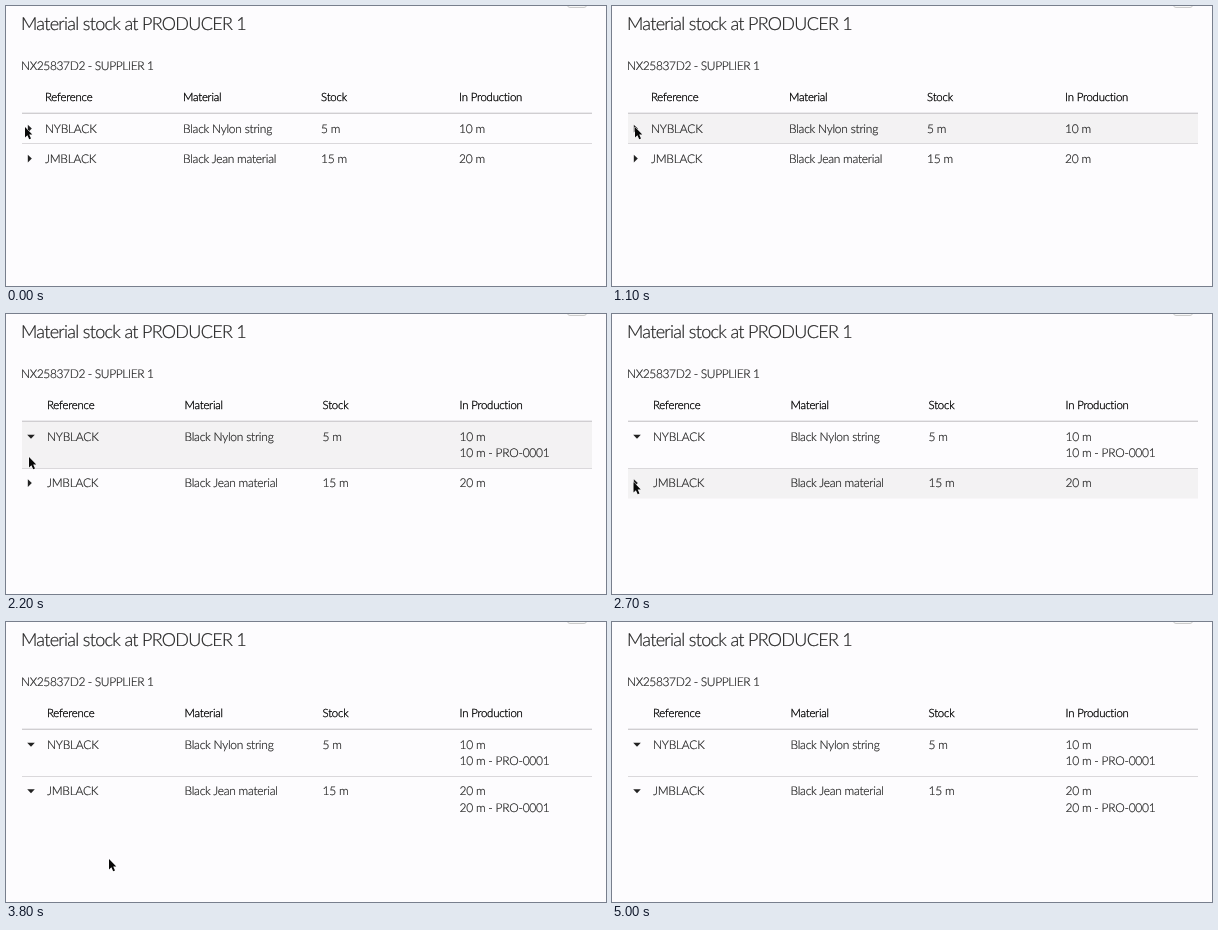
Write an HTML page that moves like this. It is 600 px wide and 280 px high and loops after 9300 ms.

```html
<!DOCTYPE html>
<html lang="en">
<head>
<meta charset="utf-8">
<title>Material stock</title>
<style>
  html, body { margin: 0; width: 100%; height: 100%; overflow: hidden; background: #fdfcfe; }
  svg { display: block; }
  text {
    font: 300 12px Lato, sans-serif; letter-spacing: -.25px; white-space: pre;
    fill: #222; stroke: #222; stroke-width: .2px; text-rendering: geometricPrecision;
  }
  .title { font-size: 18px; letter-spacing: -.7px; }
  .supplier { letter-spacing: -.38px; }
  .head { font-size: 11.4px; letter-spacing: -.2px; fill: #000; stroke: #000; stroke-width: .3px; }
</style>
</head>
<body>
<svg id="stage" width="600" height="280" viewBox="0 0 600 280">
  <rect x="561.5" y="-12" width="19" height="13.5" rx="2.5" fill="#f8f8f8" stroke="#ccc"/>
  <text class="title" x="15" y="24">Material stock at PRODUCER 1</text>
  <text class="supplier" x="15" y="64">NX25837D2 - SUPPLIER 1</text>
</svg>
<script>
const LOOP = 9300;
const OPEN_TIMES = [1300, 2900];
const HOVERS = [[200, 2300], [2300, 3800]];
const HEADINGS = ['Reference', 'Material', 'Stock', 'In Production'];
const ROWS = [
  ['NYBLACK', 'Black Nylon string', '5 m', '10 m'],
  ['JMBLACK', 'Black Jean material', '15 m', '20 m']
];
const CLOSED_COLUMNS = [39, 177, 315, 453];
const OPEN_COLUMNS = [41, 178.5, 316.5, 453.5];

// Pointer positions: time, x, y; each is held until the next
const POINTER = [
  [0, 19, 121], [200, 20, 121], [300, 22, 121], [400, 23, 121],
  [2200, 23, 143], [2300, 19, 167], [2500, 20, 167], [2700, 21.5, 168],
  [3000, 22.5, 168], [3800, 103, 237], [3900, 132, 251], [4000, 147, 258],
  [4400, 188, 272], [4500, 200, 300]
];

const stage = document.getElementById('stage');

function add(tag, attributes = {}, content = '') {
  const node = document.createElementNS('http://www.w3.org/2000/svg', tag);
  set(node, attributes);
  node.textContent = content;
  return stage.appendChild(node);
}

function set(node, attributes) {
  for (const name in attributes) node.setAttribute(name, attributes[name]);
}

const addCells = (labels, className) =>
  labels.map(label => add('text', { class: className }, label));

const placeCells = (cells, columns, y) =>
  cells.forEach((cell, i) => set(cell, { x: columns[i], y }));

const headings = addCells(HEADINGS, 'head');
const rows = ROWS.map(labels => ({
  band: add('rect', { x: 16, width: 570, fill: '#f3f2f3' }),
  cells: addCells(labels, 'cell'),
  detail: add('text', { x: 453.5 }, labels[3] + ' - PRO-0001'),
  arrow: add('path', { fill: '#222' })
}));
add('rect', { x: 16, y: 106.6, width: 570, height: 1.4, fill: '#d0ced1' });
const rowLine = add('rect', { x: 16, width: 570, height: 1, fill: '#dad8db' });
const pointer = add('path', {
  d: 'M0 0V10.4L2.4 8.2L4.2 12.2L6 11.4L4.2 7.5H7.3Z',
  fill: '#080808', stroke: '#fff', 'stroke-width': 1, 'paint-order': 'stroke'
});

function draw(time) {
  const columns = time >= OPEN_TIMES[0] ? OPEN_COLUMNS : CLOSED_COLUMNS;
  placeCells(headings, columns, 95.2);

  let top = 108;
  rows.forEach((row, i) => {
    const open = time >= OPEN_TIMES[i];
    const height = open ? 46.5 : 30;
    const [start, end] = HOVERS[i];
    const middle = top + 14.5;
    placeCells(row.cells, columns, top + 18.5);
    set(row.band, { y: top, height, visibility: time >= start && time < end ? 'visible' : 'hidden' });
    set(row.detail, { y: top + 35, visibility: open ? 'visible' : 'hidden' });
    set(row.arrow, {
      d: open ? `M21.2 ${middle - 1.7}h7.6l-3.8 4z` : `M21.8 ${middle - 3.7}v7.6l4 -3.8z`
    });
    top += height;
    if (i === 0) set(rowLine, { y: Math.floor(top - .5) });
  });

  const [, x, y] = POINTER.findLast(step => step[0] <= time);
  set(pointer, { transform: `translate(${x} ${y})` });
}

function tick() {
  draw(performance.now() % LOOP);
  requestAnimationFrame(tick);
}
tick();
</script>
</body>
</html>
```
